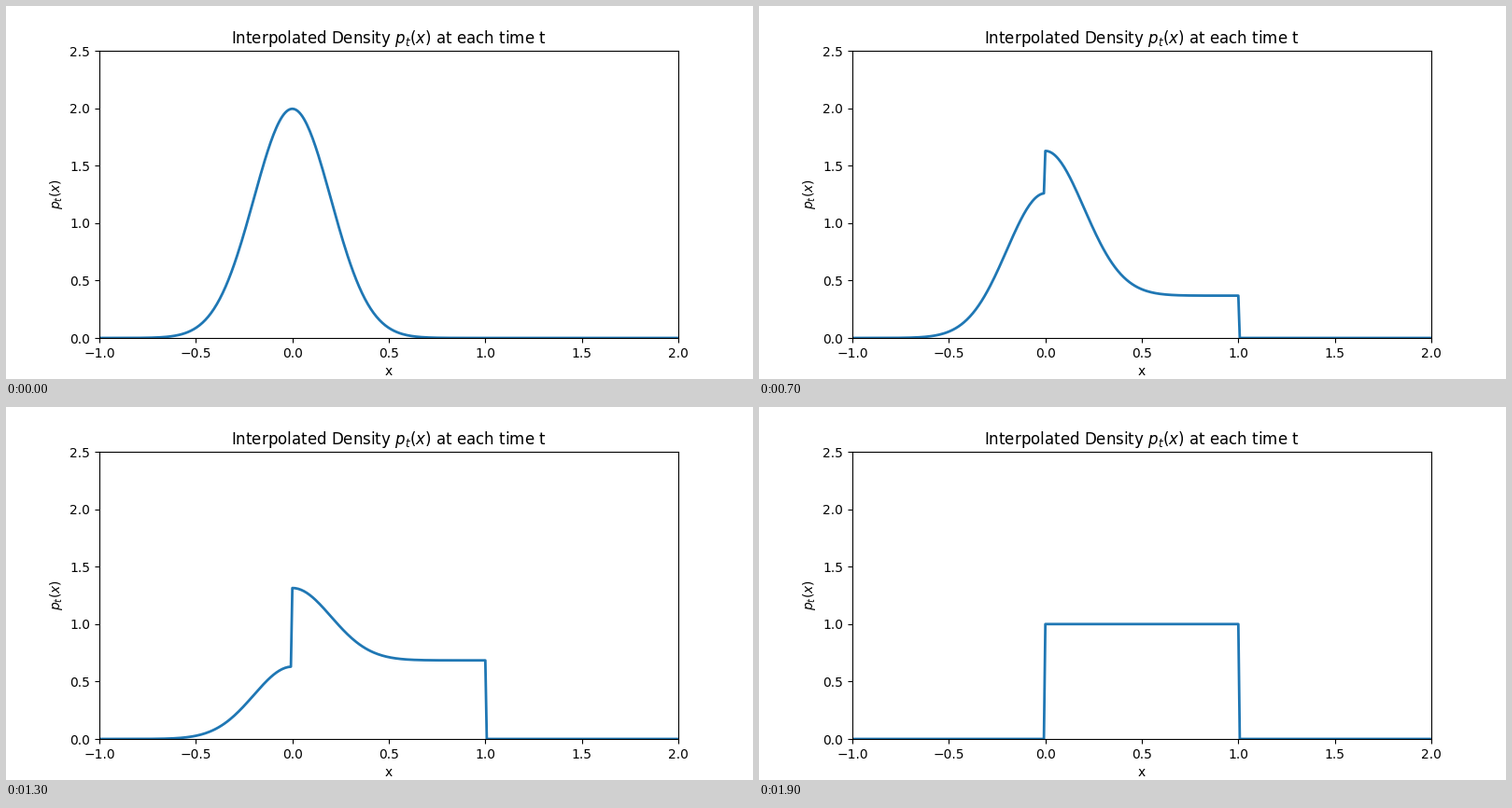
A matplotlib script that plays this animation: 800x400 px, repeating every 2000 ms.

```python
import numpy as np
import matplotlib.pyplot as plt
from matplotlib.animation import FuncAnimation

FRAMES = 20
INTERVAL = 100
SIGMA = 0.2
EPS = 1e-9

x = np.linspace(-1, 2, 400)
gauss = np.exp(-0.5 * (x / SIGMA) ** 2) / (SIGMA * np.sqrt(2 * np.pi))
uniform = ((x >= -EPS) & (x <= 1 + EPS)).astype(float)


def density(t):
    return (1 - t) * gauss + t * uniform


fig, ax = plt.subplots(figsize=(8, 4), dpi=100)
line, = ax.plot(x, density(0), lw=2)
ax.set_xlim(-1, 2)
ax.set_ylim(0, 2.5)
ax.set_xlabel("x")
ax.set_ylabel("$p_t(x)$")
ax.set_title("Interpolated Density $p_t(x)$ at each time t")


def update(i):
    line.set_ydata(density(i / (FRAMES - 1)))
    return line,


anim = FuncAnimation(fig, update, frames=FRAMES, interval=INTERVAL,
                     repeat=True, repeat_delay=0)
plt.show()
```
